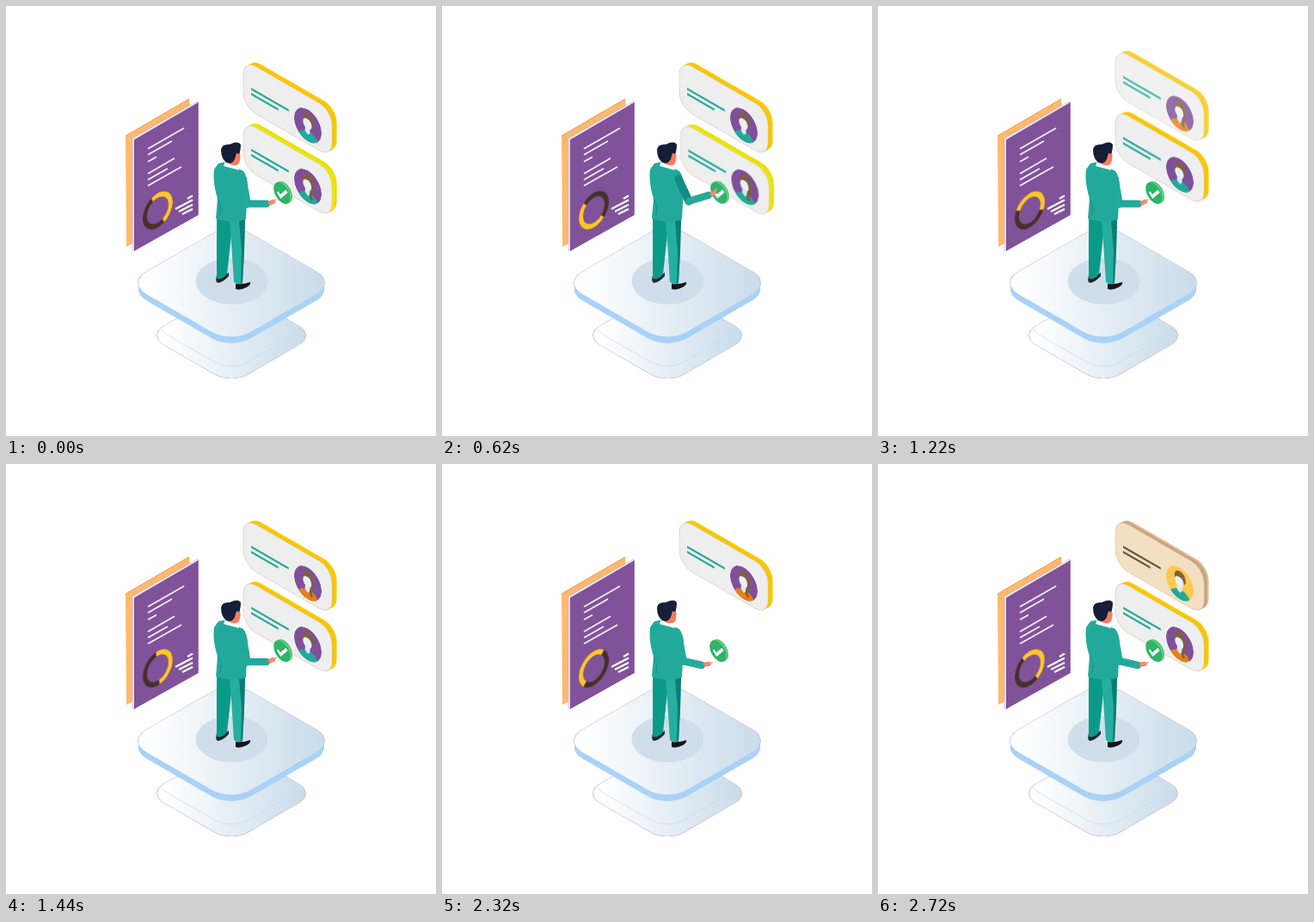
An HTML page that plays this animation: 500x500 px, repeating every 2740 ms.

```html
<!DOCTYPE html>
<html lang="en">
<head>
<meta charset="utf-8">
<title>Choosing a profile</title>
<style>
  html, body { margin: 0; width: 100%; height: 100%; overflow: hidden; background: #fff; }
  svg { display: block; width: 100vw; height: 100vh; }

  .ring, .card, .arm path, .button { animation: 2740ms linear infinite; }
  .ring { animation-name: spin; animation-duration: 1370ms; }
  @keyframes spin { to { transform: rotate(360deg); } }

  .card { --face: #eeeeee; --line: #21a99b; --disc: #7f5099; --side: #f5c703; --top: #fdc907; }
  .first { --side: #eee600; --top: #e6dd00; animation-name: first; }
  .second { animation-name: second; }
  .third { animation-name: third; }
  .fourth { animation-name: fourth; }

  /* leave along the card plane, then let the card above drop into place */
  @keyframes first {
    0%, 21.9% { transform: translate(0, 71px); opacity: 1; animation-timing-function: ease-in; }
    24.4% { transform: translate(10px, 77px); opacity: 1; }
    24.41%, 100% { transform: translate(10px, 77px); opacity: 0; }
  }
  @keyframes second {
    0%, 37.96% { transform: none; animation-timing-function: ease-in-out; }
    47.45%, 71.9% { transform: translate(0, 71px); opacity: 1; animation-timing-function: ease-in; }
    78.83% { transform: translate(79px, 117px); opacity: .7; }
    78.84%, 100% { transform: translate(79px, 117px); opacity: 0; }
  }
  @keyframes third {
    0%, 37.96% { transform: translate(0, -71px); animation-timing-function: ease-in-out; }
    47.45%, 87.96% { transform: none; animation-timing-function: ease-in-out; }
    97.45%, 100% { transform: translate(0, 71px); }
  }
  @keyframes fourth {
    0%, 87.96% { transform: translate(0, -71px); animation-timing-function: ease-in-out; }
    97.45%, 99.26% { transform: none; }
    99.27%, 100% {
      transform: none;
      --face: #f3dfc1; --line: #6b543d; --disc: #fbc94f; --side: #cda57a; --top: #dfc09a;
    }
  }
  .third > g, .fourth > g { animation: 2740ms linear infinite appearThird; }
  .fourth > g { animation-name: appearFourth; }
  @keyframes appearThird { 0%, 41.5% { opacity: 0; } 45.2%, 100% { opacity: 1; } }
  @keyframes appearFourth { 0%, 91.5% { opacity: 0; } 95.2%, 100% { opacity: 1; } }

  .button { animation-name: press; }
  @keyframes press {
    0%, 21.2%, 34%, 71.2%, 84%, 100% { transform: none; }
    22.3%, 32%, 72.3%, 82% { transform: translate(.8px, -.3px); }
  }
  @keyframes upper-shade {
    0%, 6%, 34.6%, 56%, 84.6%, 100% { stroke: #23a99b; }
    13%, 32%, 63%, 82% { stroke: #128d82; }
  }
</style>
</head>
<body>
<svg viewBox="0 0 500 500" xmlns="http://www.w3.org/2000/svg">
  <defs>
    <linearGradient id="ice" x1="0" y1="1" x2="1" y2="0"><stop offset=".1" stop-color="#fff"/><stop offset=".95" stop-color="#c9dcea"/></linearGradient>
    <clipPath id="disc"><circle r="18.500"/></clipPath>
  </defs>

  <g id="platforms"></g>
  <ellipse cx="262.5" cy="320" rx="42" ry="27" fill="#cfdeea"/>

  <g id="panel">
    <path d="M139 151 213 108 214 118 148 157V276L140 280Z" fill="#ffb96f"/>
    <path d="M139 151 213 108" stroke="#e99a4c"/>
    <path d="M147 154 222 111 224 112 149 156V285L147 284Z" fill="#f4f0f6" stroke="#b79ac4" stroke-width=".5"/>
    <path d="M149 155.500 223.800 112V243L149 285Z" fill="#80529a"/>
    <path d="M165 166 207 142M165 173 193 157M165 181 175 175.500M165 195 196 177M165 202 188 189M165 209 204 187" stroke="#f5eff8" stroke-width="1.700"/>
    <path d="M211 224 217 220.500M197 236 217 225.500M201 239 217 231M205 242 217 236" stroke="#fff" stroke-width="2.200"/>
    <g transform="matrix(.866 -.5 0 1 176.500 237.500)" fill="none" stroke-width="5.600">
      <g class="ring">
        <circle r="17.300" stroke="#46302a"/>
        <path d="M-7.580 -15.550A17.300 17.300 0 0 1 7.580 15.550" stroke="#ffc52b"/>
      </g>
    </g>
  </g>

  <g id="cards"></g>

  <g class="button">
    <g id="rim"></g>
    <g transform="matrix(.866 .5 0 1 320.900 217.600)">
      <circle r="11.200" fill="#2fb36b"/>
      <path d="M-6 1.500 -2 5 6.500 -5.500" fill="none" stroke="#fff" stroke-width="3.200"/>
    </g>
  </g>

  <g id="man">
    <path d="M245 313Q252 316 259 310L259 314Q253 321 246 322Q243 320 245 313Z" fill="#20242c"/>
    <path d="M267 323Q276 324 284 321Q285 324 280 327Q272 331 267 329Z" fill="#15171d"/>
    <path d="M245 246 264 248 260 285 257 312Q251 319 245 317Z" fill="#0a9a88"/>
    <path d="M260 247 278 246 277 285 275 322Q270 325 265 321L263 290Z" fill="#26aea0"/>
    <path d="M271 250 278 247 277 285 275 322 273 323 274 285Z" fill="#0b7d73"/>
    <path d="M247 183 256 181 268 188 276 192Q281 198 281 211L279 248Q262 254 244 247L246 224Q240 205 242 190Z" fill="#23a99b"/>
    <path d="M246 224Q251 232 249 244" fill="none" stroke="#178f83"/>
    <path d="M255 180 268 184 271 191 264 189 253 186Z" fill="#fff"/>
    <path d="M257 174 271 166Q274 174 271 183Q266 188 257 182Z" fill="#f57b62"/>
    <path d="M250 167Q251 160 260 161Q269 156 273 161Q273 168 271 172L268 171 266 178 264 181Q262 184 256 182Q250 177 250 167Z" fill="#151f38"/>
  </g>
  <g class="arm" id="arm" fill="none" stroke-linecap="round" stroke-linejoin="round"></g>
</svg>

<script>
  const $ = id => document.getElementById(id);
  const LOOP = 2740;

  // Rounded square lying on the isometric floor
  const slab = (x, y, half, r, attrs) =>
    `<rect x="${-half}" y="${-half}" width="${2 * half}" height="${2 * half}" rx="${r}"
      transform="matrix(.866 .5 -.866 .5 ${x} ${y})" ${attrs}/>`;
  const repeat = (n, draw) => Array.from({ length: n }, (_, i) => draw(i)).join('');
  const fringe = 'fill="none" stroke="#c7aed3" stroke-width="1.2"';

  $('platforms').innerHTML =
    slab(262, 383, 56.100, 22, fringe) +
    slab(262, 383, 56.100, 22, 'fill="url(#ice)"') +
    '<path d="M180 376Q185 381 192 385L243 414Q262 424 281 414L332 385Q339 381 344 376" fill="none" stroke="#c9dced" stroke-width=".8"/>' +
    slab(262, 322, 70, 26, fringe) +
    repeat(8, i => slab(262, 329.500 - i, 70, 26, 'fill="#a9d2f7"')) +
    slab(262, 322, 70, 26, 'fill="url(#ice)"');

  $('rim').innerHTML = repeat(4, i =>
    `<circle r="11.200" transform="matrix(.866 .5 0 1 ${323.300 - i * .6} ${216.300 + i * .35})" fill="${i ? '#62d47d' : '#3ca866'}"/>`);

  const cardBox = 'width="119" height="55" rx="17"';
  const plane = (x, y) => `transform="matrix(.866 .5 0 1 ${x} ${y})"`;

  function card(name, shirt, braid) {
    const edge = repeat(7, i =>
      `<rect ${cardBox} ${plane(281.500 - i * .9, 59.200 + i * .47)} style="fill:var(--${i < 2 ? 'top' : 'side'})"/>`);
    return `<g class="card ${name}"><g>${edge}
      <g ${plane(276, 62)}>
        <rect ${cardBox} style="fill:var(--face)" stroke="#cfc3d6" stroke-width=".5"/>
        <path d="M10.400 29H61M10.400 35H47" style="stroke:var(--line)" stroke-width="2.400"/>
        <g transform="translate(86.600 33.500)" clip-path="url(#disc)">
          <circle r="18.500" style="fill:var(--disc)"/>
          <path d="M-14 19Q-13 10 -4 8L4 7Q13 8 15 19Z" fill="${shirt}"/>
          <path d="M-3 0H3V8L0 11 -4 8Z" fill="#dce7f2"/>
          <ellipse cx="-.5" cy="-2" rx="6" ry="6.500" fill="#e8eff6"/>
          <path d="M-7 -4Q-8 -14 0 -14Q8 -14 8 -4L5.500 0Q5 -6 1 -7Q-4 -8 -7 -4Z" fill="#80603f"/>
          ${braid ? '<path d="M5 -7Q8 0 5 5T6 13" fill="none" stroke="#80603f" stroke-width="3.500"/>' : ''}
        </g>
      </g></g></g>`;
  }
  const teal = '#20aa9c', orange = '#e77f17';
  $('cards').innerHTML = card('first', teal, true) + card('second', teal, false) +
    card('third', orange, true) + card('fourth', teal, false);

  // Arm poses: elbow, wrist and fingertip
  const poses = {
    rest: [280, 230, 303, 230, 314, 225],
    low: [280, 229, 302, 234, 314, 231],
    reach: [296, 218, 314, 204, 320, 190],
    push: [287, 227, 310, 220, 319, 213]
  };
  const schedule = [
    [0, 'rest'], [150, 'rest'], [400, 'reach'], [500, 'reach'], [600, 'push'], [870, 'push'], [950, 'rest'],
    [1520, 'rest'], [1770, 'reach'], [1870, 'reach'], [1970, 'push'], [2240, 'push'], [2320, 'low'], [LOOP, 'low']
  ];
  const parts = {
    upper: [([ex, ey]) => `M275 201L${ex} ${ey}`, '#23a99b', 9.500],
    fore: [([ex, ey, wx, wy]) => `M${ex} ${ey}L${wx} ${wy}`, '#23a99b', 8.500],
    palm: [([, , wx, wy, tx, ty]) => `M${wx + 4} ${wy - 1}L${(wx + tx) / 2 + 2} ${(wy + ty) / 2}`, '#f57b62', 5],
    finger: [([, , wx, wy, tx, ty]) => `M${wx + 5} ${wy - 1}L${tx} ${ty}`, '#f79a80', 1.700]
  };

  let rules = '';
  for (const [name, [shape, color, width]] of Object.entries(parts)) {
    const steps = schedule.map(([time, pose]) =>
      `${time / LOOP * 100}% { d: path("${shape(poses[pose])}"); animation-timing-function: ease-in-out; }`);
    rules += `@keyframes ${name} { ${steps.join(' ')} } .arm .${name} { animation-name: ${name}, ${name}-shade; }`;
    $('arm').innerHTML += `<path class="${name}" d="${shape(poses.rest)}" stroke="${color}" stroke-width="${width}"/>`;
  }
  document.head.appendChild(document.createElement('style')).textContent = rules;
</script>
</body>
</html>
```
